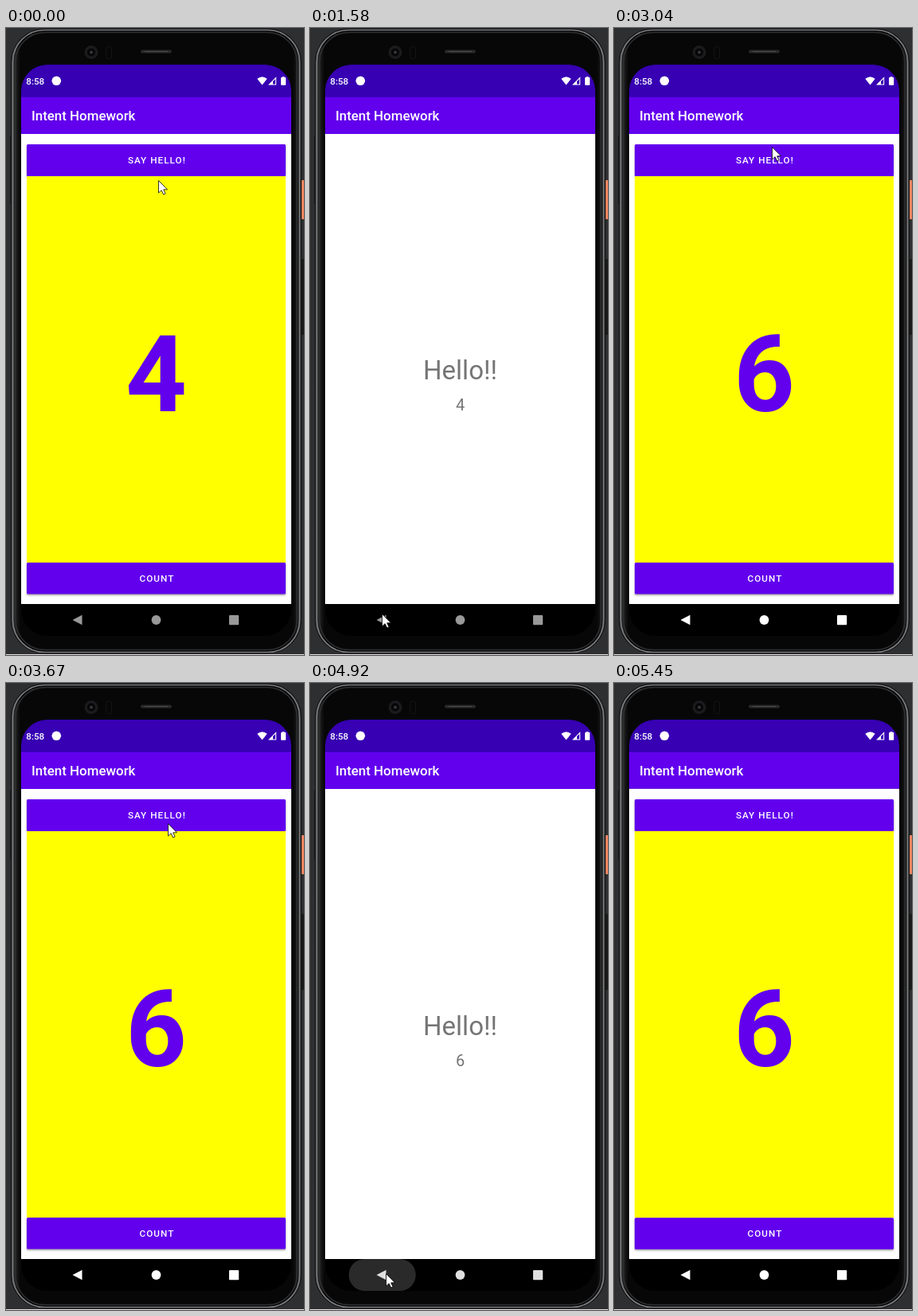
Animation of 374x787 px, one loop 5.6 s. Source, as an HTML page with a canvas:

```html
<!DOCTYPE html>
<html lang="en">
<head>
<meta charset="utf-8">
<title>Intent Homework</title>
<style>
  html, body { margin: 0; width: 100%; height: 100%; overflow: hidden; background: #2e2f31; }
  canvas { display: block; width: 374px; height: 787px; }
</style>
</head>
<body>
<canvas id="stage"></canvas>
<script>
const W = 374, H = 787, LOOP = 5600;
const canvas = document.getElementById('stage');
const dpr = window.devicePixelRatio || 1;
canvas.width = W * dpr;
canvas.height = H * dpr;
const c = canvas.getContext('2d');

const PURPLE = '#6200ee', DARK = '#3700b3', YELLOW = '#ffff00', GREY = '#757575';
const FONT = 'Roboto, sans-serif';
const screen = { x: 19, y: 46, w: 339, h: 717 };
const CX = screen.x + screen.w / 2, CY = screen.y + screen.h / 2;

const STEP = 135;
const beats = [0, 680, 1310, 2000, 2560, 3040, 3670, 3930, 4650, 4920, 5160, LOOP];

// The greeting opens twice; each time the back button closes it.
const visits = [
  { open: 680, press: 1450, release: 1862, close: 1870 },
  { open: 3930, press: 4510, release: 4920, close: 5040 }
];
const countTaps = [2560, 2800];

// Pointer moves, each from wherever the last one ended.
const moves = [
  { from: 0, to: 120, x: 191, y: 158 },
  { from: 830, to: 1310, x: 90, y: 727 },
  { from: 1310, to: 1440, x: 90, y: 735 },
  { from: 1590, to: 2000, x: 113, y: 708 },
  { from: 2000, to: 2280, x: 180, y: 689 },
  { from: 2800, to: 3040, x: 198, y: 149 },
  { from: 3040, to: 3670, x: 203, y: 176 },
  { from: 4050, to: 4500, x: 92, y: 731 },
  { from: 4500, to: 4920, x: 95, y: 741 },
  { from: 4920, to: 5160, x: 125, y: 800 }
];

const ramp = (t, a, b) => Math.min(1, Math.max(0, (t - a) / (b - a)));
const ease = k => k * k * k * (k * (k * 6 - 15) + 10);
const decay = (age, tau) => Math.exp(-age / tau);
const gray = v => `rgb(${v},${v},${v})`;

function lastTick(now) {
  const i = beats.findIndex(b => b > now);
  const a = beats[i - 1], span = beats[i] - a;
  const step = span / Math.round(span / STEP);
  return a + Math.floor((now - a) / step) * step;
}

function rect(x, y, w, h, color) {
  c.fillStyle = color;
  c.fillRect(x, y, w, h);
}

function roundPath(x, y, w, h, r) {
  c.beginPath();
  c.roundRect(x, y, w, h, r);
}

function round(x, y, w, h, r, color) {
  roundPath(x, y, w, h, r);
  c.fillStyle = color;
  c.fill();
}

function outline(x, y, w, h, r, color, width) {
  roundPath(x, y, w, h, r);
  c.strokeStyle = color;
  c.lineWidth = width;
  c.stroke();
}

function poly(points, color) {
  c.beginPath();
  points.forEach(([x, y]) => c.lineTo(x, y));
  c.closePath();
  c.fillStyle = color;
  c.fill();
}

function disc(x, y, r, color) {
  c.beginPath();
  c.arc(x, y, r, 0, Math.PI * 2);
  c.fillStyle = color;
  c.fill();
}

function text(str, x, y, size, weight, color, align = 'center', spacing = 0) {
  c.font = `${weight} ${size}px ${FONT}`;
  c.letterSpacing = spacing + 'px';
  c.textAlign = align;
  c.fillStyle = color;
  c.fillText(str, x, y);
}

function bodyShade() {
  const g = c.createLinearGradient(7, 0, 371, 0);
  g.addColorStop(0, '#353536');
  g.addColorStop(0.03, '#070708');
  g.addColorStop(0.97, '#070708');
  g.addColorStop(1, '#2a2a2b');
  return g;
}

function drawPhone() {
  rect(0, 0, W, H, '#2e2f31');
  rect(0, 786, W, 1, '#e4dede');
  rect(5, 135, 2, 86, '#1c1c1d');
  rect(371, 290, 3, 95, '#19191a');
  round(6.5, 1, 364, 784, 42, bodyShade());
  rect(370.5, 191, 3.5, 49, '#ec8460');
  outline(6.5, 1, 364, 784, 42, '#151516', 1);
  outline(8.5, 2.5, 360, 781, 40, '#7c7d7f', 1.7);
  outline(12, 5.5, 353, 775, 37, '#2f3031', 1.5);
  disc(107, 30.5, 8.5, '#1b1b1d');
  disc(107, 30.5, 5, '#060607');
  disc(107, 30.5, 2, '#36373b');
  outline(125.5, 23.5, 7, 15, 2, '#141415', 1);
  round(169, 27.5, 39, 4, 2, '#2a2a2b');
  rect(174, 29, 29, 1, '#4a4a4b');
}

function button(label, y, h, pressed) {
  c.save();
  c.shadowColor = 'rgba(0,0,0,.38)';
  c.shadowBlur = (pressed ? 5 : 2.5) * dpr;
  c.shadowOffsetY = (pressed ? 3 : 1.5) * dpr;
  round(26, y, 325, h, 1.5, PURPLE);
  c.restore();
  text(label, CX + 0.9, y + h / 2 + 4.3, 11.7, 500, '#fff', 'center', 1.04);
}

function windowBase() {
  rect(19, 46, 339, 41, DARK);
  rect(19, 86.8, 339, 46.2, PURPLE);
  rect(19, 133, 339, 590, '#fff');
  rect(19, 723, 339, 40, '#000');
  text('Intent Homework', 32, 116, 16.9, 500, '#fff', 'left');
}

function mainWindow(t) {
  const count = 4 + countTaps.filter(tap => t >= tap).length;
  const pressed = countTaps.some(tap => t < tap && t >= tap - 140);
  windowBase();
  button('SAY HELLO!', 146, 40, false);
  rect(26, 186, 325, 485, YELLOW);
  button('COUNT', 671, 39.5, pressed);
  text(count, CX, 480.5, 133.5, 700, PURPLE);
}

function helloWindow(t) {
  windowBase();
  text('Hello!!', CX, 441.5, 33, 400, GREY);
  text(4 + countTaps.filter(tap => t >= tap).length, CX, 480.5, 20, 400, GREY);
}

function scaled(s, drawWindow, t) {
  c.save();
  c.translate(CX, CY);
  c.scale(s, s);
  c.translate(-CX, -CY);
  drawWindow(t);
  c.restore();
}

function drawWindows(t) {
  const visit = visits.filter(v => t >= v.open).pop();
  if (!visit) return mainWindow(t);
  if (t >= visit.close) {
    return scaled(1 + 0.08 * decay(t - visit.close, 52), mainWindow, t);
  }
  // Opening: the old screen grows and dims while the new one settles in.
  const age = t - visit.open;
  if (age < 250) {
    scaled(1.05 - 0.004 * decay(age, 80), mainWindow, t);
    rect(screen.x, screen.y, screen.w, screen.h, 'rgba(0,0,0,.2)');
  }
  scaled(1 - 0.015 * decay(age, 80), helloWindow, t);
}

function statusIcons() {
  text('8:58', 25.3, 70.8, 11.65, 500, '#fff', 'left');
  disc(63.3, 66.3, 5.8, '#fff');
  c.beginPath();
  c.moveTo(321.5, 71.5);
  c.lineTo(315.3, 63.8);
  c.quadraticCurveTo(321.5, 58.6, 327.7, 63.8);
  c.fillStyle = '#fff';
  c.fill();
  poly([[329, 71.5], [339.2, 61.3], [339.2, 71.5]], '#fff');
  poly([[335, 70.4], [335, 67], [338.1, 63.9], [338.1, 70.4]], DARK);
  round(345, 62, 6.2, 9.7, 0.8, '#fff');
  rect(346.7, 61, 2.8, 1.2, '#fff');
}

function ripple(t, { press, release }) {
  const grow = ramp(t, press, press + 400);
  const fade = ramp(t, release, release + 187);
  const level = 42 * Math.min(1, grow * 2) * (1 - fade);
  if (level <= 0) return;
  const half = 24 + 18 * grow + 2 * fade;
  round(90.7 - half, 723, half * 2, 40, 20, gray(level));
}

function navIcons(t) {
  visits.forEach(v => ripple(t, v));
  const color = gray(153 + 102 * ramp(t, 1586, 1862)
    - 31 * ramp(t, 4050, 4650) + 31 * ramp(t, 4920, 5160));
  poly([[83.5, 743], [95.5, 736.8], [95.5, 749.2]], color);
  disc(CX, 743, 5.9, color);
  round(280, 737, 12.2, 12.2, 1, color);
}

function pointer(t) {
  let x = 191, y = 191;
  for (const m of moves) {
    const k = ease(ramp(t, m.from, m.to));
    x += (m.x - x) * k;
    y += (m.y - y) * k;
  }
  c.save();
  c.translate(x + 0.5, y + 0.5);
  poly([[0, 0], [0, 15.5], [3.6, 12.2], [6.2, 17.5], [8.6, 16.4],
        [6.2, 11.3], [11, 11.3]], '#fff');
  c.strokeStyle = '#000';
  c.lineWidth = 0.8;
  c.stroke();
  c.restore();
}

function draw(t) {
  c.setTransform(dpr, 0, 0, dpr, 0, 0);
  drawPhone();
  c.save();
  roundPath(screen.x, screen.y, screen.w, screen.h, 33);
  c.clip();
  drawWindows(t);
  statusIcons();
  navIcons(t);
  c.restore();
  pointer(t);
}

const start = performance.now();
function loop() {
  const now = Math.max(0, performance.now() - start) % LOOP;
  draw(lastTick(now));
  requestAnimationFrame(loop);
}
loop();
</script>
</body>
</html>
```
